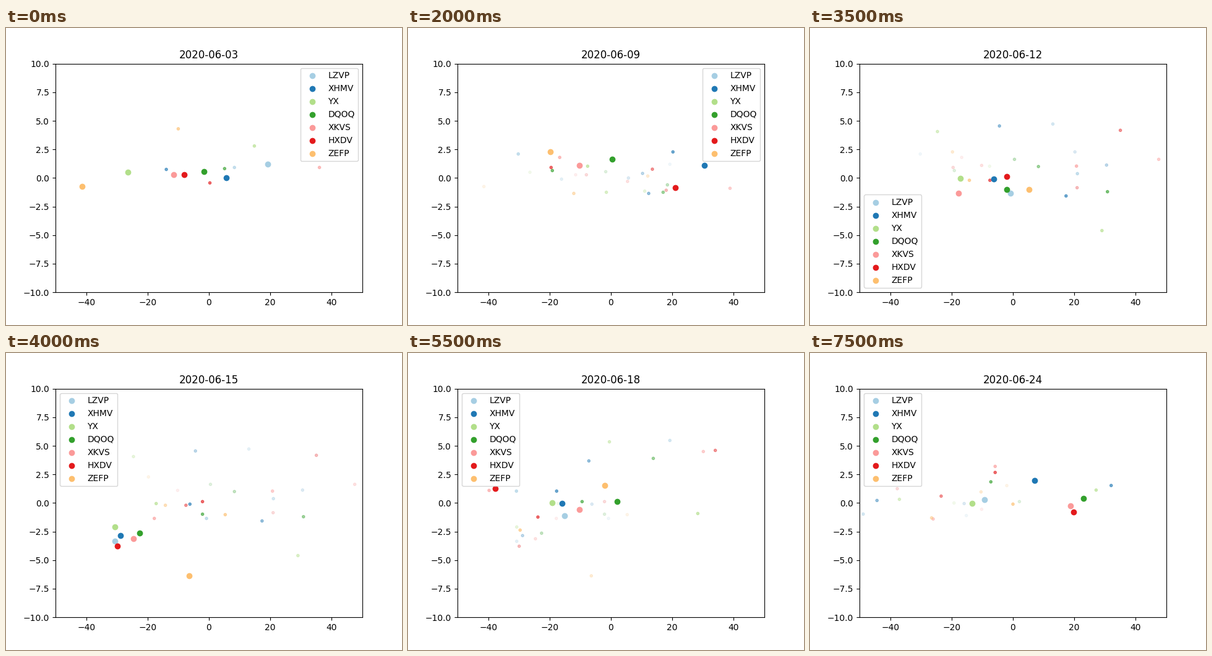
A matplotlib script for the animation above (8000 ms loop, 640 by 480 pixels).

```python
import numpy as np
import matplotlib.pyplot as plt
from matplotlib.animation import FuncAnimation

NAMES = ["LZVP", "XHMV", "YX", "DQOQ", "XKVS", "HXDV", "ZEFP"]
COLORS = np.array(plt.get_cmap("Paired").colors[:len(NAMES)])
TRAIL_ALPHA = (0.6, 0.42, 0.25, 0.13)  # newest to oldest
OFF = np.nan  # outside the axes limits

days = []


def day(xs, ys):
    """Store one trading day: volume change (%) and price change (%)."""
    days.append(np.column_stack([xs, ys]))


day([8.3, -13.9, 14.8, 5.1, 36, 0.3, -10],
    [0.92, 0.75, 2.8, 0.82, 0.92, -0.43, 4.3])
day([19.2, 5.7, -26.4, -1.7, -11.5, -8, -41.4],
    [1.2, 0, 0.5, 0.55, 0.28, 0.28, -0.75])
day([-16.1, 10.3, 11, 18.4, 5.4, 18, 12],
    [-0.1, 0.4, -1.15, -0.6, -0.3, -1.07, 0.17])
day([OFF, 12.3, -1.5, 17, 38.8, 13.5, -12.1],
    [OFF, -1.35, -1.25, -1.25, -0.9, 0.77, -1.35])
day([-30.2, 20.2, -7.6, -19.1, -16.7, -19.5, OFF],
    [2.1, 2.28, 1.03, 0.65, 1.8, 0.92, OFF])
day([OFF, 30.5, OFF, 0.5, -10.2, 20.9, -19.7],
    [OFF, 1.13, OFF, 1.63, 1.1, -0.85, 2.28])
day([13, -4.4, -24.6, 8.3, 47.5, 35, OFF],
    [4.72, 4.55, 4.06, 1, 1.63, 4.17, OFF])
day([21, 17.3, 29, 30.8, 20.7, -7.5, -14.2],
    [0.38, -1.57, -4.6, -1.2, 1.04, -0.2, -0.2])
day([-0.8, -6.2, -17.2, -2.1, -17.8, -2.1, 5.3],
    [-1.35, -0.1, -0.05, -0.98, -1.35, 0.12, -1.02])
day([-30.7, -28.8, -30.7, -22.6, -24.6, -29.9, -6.4],
    [-3.35, -2.85, -2.1, -2.64, -3.13, -3.78, -6.37])
day([19.2, -7.2, -0.5, 13.8, 30.1, 34, -10.5],
    [5.47, 3.68, 5.35, 3.9, 4.5, 4.6, 10.25])
day([-30.8, -17.7, 28.3, -9.4, -39.7, -23.8, -29.6],
    [1.04, 1.04, -0.92, 0.12, 1.1, -1.23, -2.37])
day([-15.2, -15.9, -19.2, 2.1, -10.2, -37.7, -2],
    [-1.1, -0.05, 0, 0.12, -0.55, 1.25, 1.52])
day([OFF, OFF, OFF, OFF, OFF, OFF, -10.4],
    [OFF, OFF, OFF, OFF, OFF, OFF, 0.97])
day([-48.8, -44.3, -37, OFF, -26, -23.4, -26.5],
    [-0.97, 0.22, 0.32, OFF, -1.4, 0.6, -1.3])
day([OFF, 32, 27.1, -7.2, -5.8, -5.8, 0],
    [OFF, 1.53, 1.13, 1.85, 3.2, 2.67, -0.1])
day([-9.3, 7.1, -13.3, 22.9, 18.8, 19.8, OFF],
    [0.28, 1.97, -0.05, 0.4, -0.25, -0.8, OFF])

dates = np.busday_offset("2020-06-02", np.arange(len(days)))

fig, ax = plt.subplots(figsize=(6.4, 4.8), dpi=100)
ax.set_xlim(-50, 50)
ax.set_ylim(-10, 10)

trail = ax.scatter([], [], s=9)
heads = [ax.scatter([0], [0], s=36, color=[c], label=n)
         for n, c in zip(NAMES, COLORS)]
legend = ax.legend(loc="upper right")
title = ax.set_title("")


def legend_loc(i):
    if i < 5:
        return "upper right"
    return "lower left" if i < 8 else "upper left"


def update(i):
    now = i + 1  # the first day only appears as trail
    points, tints = [], []
    for age in range(min(now, len(TRAIL_ALPHA)), 0, -1):
        alpha = np.full((len(NAMES), 1), TRAIL_ALPHA[age - 1])
        points.append(days[now - age])
        tints.append(np.hstack([COLORS, alpha]))
    trail.set_offsets(np.vstack(points))
    trail.set_facecolor(np.vstack(tints))
    for head, pos in zip(heads, days[now]):
        head.set_offsets([pos])
    title.set_text(str(dates[now]))
    legend.set_loc(legend_loc(i))
    return [trail, *heads, title, legend]


anim = FuncAnimation(fig, update, frames=len(days) - 1, interval=500,
                     repeat=True, repeat_delay=0)
plt.show()
```
